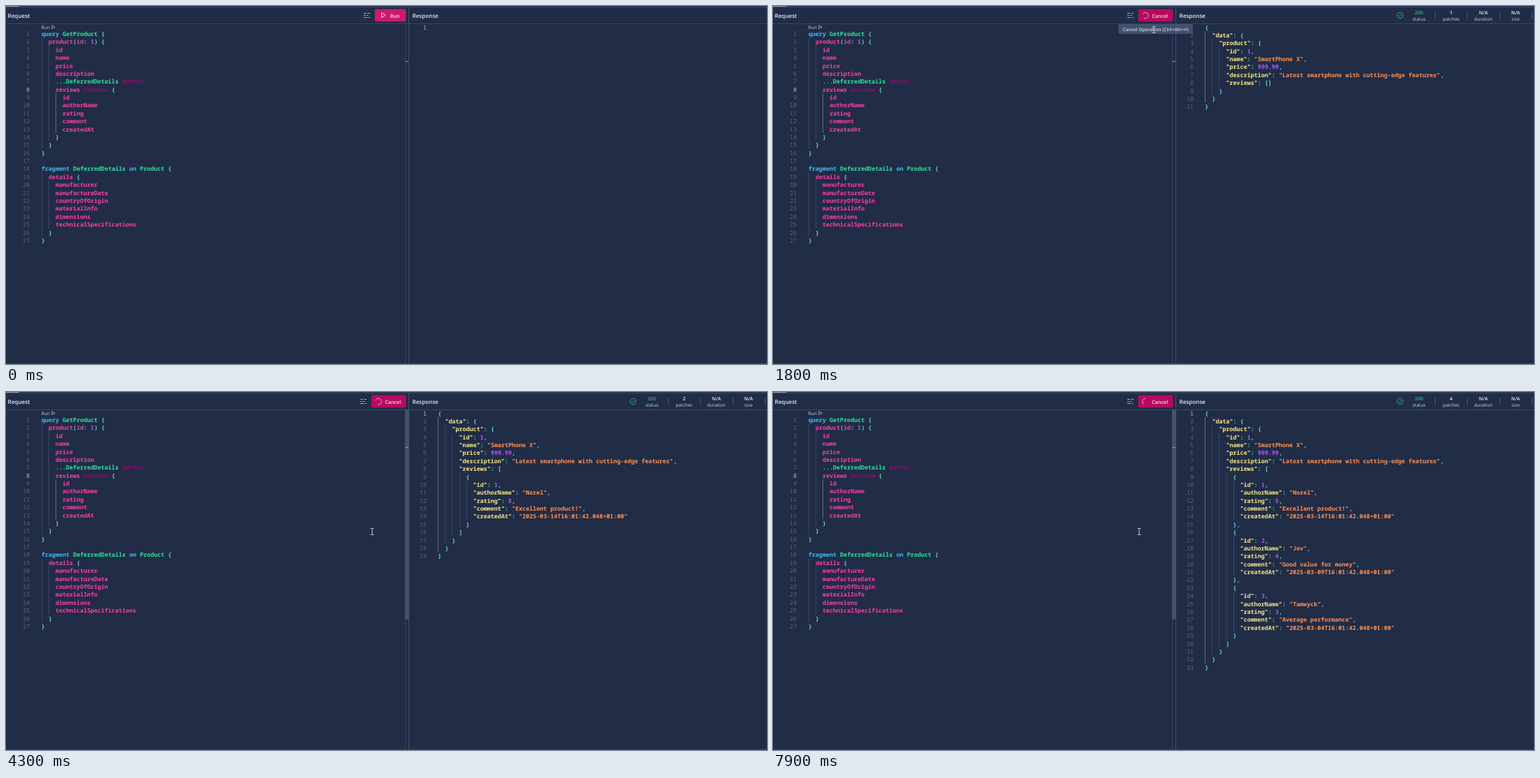
Write an HTML page with a canvas that moves like this. It is 1091 px wide and 513 px high and loops after 8 s.

```html
<!DOCTYPE html>
<html lang="en">
<head>
<meta charset="utf-8">
<title>Streaming query</title>
<style>
  html, body { margin: 0; width: 100%; height: 100%; overflow: hidden; background: #212c46; }
  canvas { display: block; }
</style>
</head>
<body>
<canvas id="stage" width="1091" height="513"></canvas>
<script>
const ctx = document.getElementById('stage').getContext('2d');
const LOOP = 8000, STEP = 100;
const MONO = '600 8.4px "Noto Sans Mono", "DejaVu Sans Mono", monospace';
const MONO_THIN = MONO.replace('600', '400');
const COL = 5.04, ROW = 11.38;
const C = {
  bg: '#212c46', border: '#3c4a68', guide: '#3a4764', guideOn: '#606d87',
  num: '#5a6782', numOn: '#b3bccb', text: '#e8ebf1', soft: '#cdd4df',
  keyword: '#40bdf4', type: '#2fe3a5', field: '#fc40a4', directive: '#8c0c6c',
  punct: '#62d6c8', number: '#a85ffa', key: '#f8e987', string: '#ff9055',
  ok: '#25c68c', button: '#cb1b6c', buttonOn: '#b50c60', tip: '#41506f'
};

const query = `query GetProduct {
  product(id: 1) {
    id
    name
    price
    description
    ...DeferredDetails @defer
    reviews @stream {
      id
      authorName
      rating
      comment
      createdAt
    }
  }
}

fragment DeferredDetails on Product {
  details {
    manufacturer
    manufactureDate
    countryOfOrigin
    materialInfo
    dimensions
    technicalSpecifications
  }
}`.split('\n');

const reviews = [
  ['Norel', 5, 'Excellent product!', '14'],
  ['Jev', 4, 'Good value for money', '09'],
  ['Tamwyck', 3, 'Average performance', '04']
].map(([authorName, rating, comment, day], i) => ({
  id: i + 1, authorName, rating, comment,
  createdAt: `2025-03-${day}T16:01:42.048+01:00`
}));

// Arrival of the first payload, then one review per gap
const FIRST = 1400, GAP = 1800;
const responses = [0, 1, 2, 3].map(n => JSON.stringify({
  data: { product: {
    id: 1, name: 'SmartPhone X', price: 999.99,
    description: 'Latest smartphone with cutting-edge features',
    reviews: reviews.slice(0, n)
  } }
}, null, 2).split('\n'));

const queryTokens = [
  [/^(query|fragment|on)$/, C.keyword], [/^@/, C.directive],
  [/^([A-Z]|\.\.\.)/, C.type], [/^\d/, C.number], [/^\w/, C.field], [/./, C.punct]
];
const jsonTokens = [
  [/^".*":$/, C.key], [/^"/, C.string], [/^\d/, C.number], [/./, C.punct]
];

const clamp = v => Math.max(0, Math.min(1, v));
const ui = (size, weight = 400) => `${weight} ${size}px "Open Sans", "Noto Sans", "DejaVu Sans", sans-serif`;

function text(s, x, y, font, color, align = 'left') {
  ctx.font = font;
  ctx.fillStyle = color;
  ctx.textAlign = align;
  ctx.fillText(s, x, y);
}

function rect(x, y, w, h, color) {
  ctx.fillStyle = color;
  ctx.fillRect(x, y, w, h);
}

function round(x, y, w, h, r, color) {
  ctx.fillStyle = color;
  ctx.beginPath();
  ctx.roundRect(x, y, w, h, r);
  ctx.fill();
}

function stroke(d, x, y, color, width = 1, cap = 'round') {
  ctx.save();
  ctx.translate(x, y);
  ctx.strokeStyle = color;
  ctx.lineWidth = width;
  ctx.lineJoin = 'round';
  ctx.lineCap = cap;
  ctx.stroke(new Path2D(d));
  ctx.restore();
}

function fillPath(d, x, y, fill, edge) {
  ctx.save();
  ctx.translate(x, y);
  const p = new Path2D(d);
  ctx.fillStyle = fill;
  ctx.fill(p);
  ctx.strokeStyle = edge;
  ctx.lineWidth = 0.6;
  ctx.stroke(p);
  ctx.restore();
}

// One code pane: indent guides, line numbers and coloured tokens
function code(lines, x, top, numX, split, rules, active, guideOn) {
  lines.forEach((line, i) => {
    const y = Math.round(top + i * ROW);
    const next = Math.round(top + (i + 1) * ROW);
    const indent = line.search(/\S/);
    for (let c = 0; c < indent; c += 2) {
      rect(Math.round(x + c * COL), y - 9, 1, next - y, guideOn(i + 1, c) ? C.guideOn : C.guide);
    }
    text(i + 1, numX, y, MONO_THIN, i + 1 === active ? C.numOn : C.num, 'right');
    for (const m of line.matchAll(split)) {
      const color = rules.find(r => r[0].test(m[0]))[1];
      const isKey = color === C.key;
      const at = x + m.index * COL;
      text(isKey ? m[0].slice(0, -1) : m[0], at, y, MONO, color);
      if (isKey) text(':', at + (m[0].length - 1) * COL, y, MONO, C.punct);
    }
  });
}

function frame() {
  rect(0, 0, 1091, 513, C.bg);
  rect(0, 1, 1091, 1, C.border);
  rect(0, 0, 19, 1, '#8d97a9');
  rect(0, 25, 1091, 1, C.border);
  rect(0, 512, 1091, 1, C.border);
  rect(572, 26, 1, 486, '#344160');
  rect(577, 2, 1, 510, '#43506d');
  text('Request', 2.5, 17, ui(8.1, 600), C.text);
  text('Response', 582.5, 17, ui(8.1, 600), C.text);
  text('Run', 50.6, 33, ui(6.6), C.soft);
  stroke('M0 0V4.4L4.2 2.2Z', 65.7, 28.2, C.soft, 0.7);
}

function scrollbar(alpha) {
  ctx.globalAlpha = alpha;
  rect(572, 26, 5, 300, '#44516d');
  ctx.globalAlpha = 1;
  rect(572, 79, 5, 1, '#71989f');
}

function stats(patches) {
  ctx.strokeStyle = C.ok;
  ctx.lineWidth = 0.9;
  ctx.beginPath();
  ctx.arc(899, 13.5, 4.2, 0, Math.PI * 2);
  ctx.stroke();
  stroke('M-1.8 0L-.5 1.4L2 -1.3', 899, 13.5, C.ok, 0.9);
  const items = [['200', 'status'], [patches, 'patches'], ['N/A', 'duration'], ['N/A', 'size']];
  items.forEach(([value, label], i) => {
    const x = 926 + i * 46.2;
    text(value, x, 11.5, ui(6.9, 600), i ? C.text : C.ok, 'center');
    text(label, x, 21, ui(6.6), C.soft, 'center');
    rect(Math.round(949 + i * 46.4), 8, 1, 11, '#4a5773');
  });
}

// Arc that grows from its head, then shrinks from its tail, while turning
function spinner(t) {
  const p = (((t - 2400) / 1270 + 0.93) % 1 + 1) % 1;
  const ease = u => u < 0.5 ? 2 * u * u : 1 - 2 * (1 - u) ** 2;
  const grow = ease(clamp(p * 2)), shrink = ease(clamp(p * 2 - 1));
  const from = 15 * grow + 110 * shrink;
  const to = Math.min(126.9, from + 1 + 99 * grow);
  const angle = v => (v / 126.9 + p) * Math.PI * 2;
  ctx.strokeStyle = '#f0b4cf';
  ctx.lineWidth = 0.9;
  ctx.beginPath();
  ctx.arc(534, 13.5, 4.3, angle(from), angle(to));
  ctx.stroke();
}

function toolbar(t, running, hover) {
  const left = running ? 523.7 : 528.7;
  round(left, 4.5, 573.3 - left, 17.8, 2, hover ? C.buttonOn : C.button);
  if (running) {
    spinner(t);
    text('Cancel', 543.2, 16.7, ui(7.2, 600), '#f6dce8');
  } else {
    stroke('M0 0V6.4L5 3.2Z', 538.5, 10.2, '#fbe6ef', 0.9);
    text('Run', 550.7, 16.7, ui(7.2, 600), '#fbe6ef');
  }
  stroke('M0 0H4M5.5 0H9M0 3H2.5M4 3H6.5M0 6H5M6.5 6H9', left - 15.7, 10.5, '#b9c1cf', 0.9, 'butt');
}

function tooltip(label, x, y, w, alpha) {
  ctx.globalAlpha = alpha;
  ctx.shadowColor = 'rgba(10,16,32,.35)';
  ctx.shadowBlur = 2;
  round(x, y, w, 14, 2, C.tip);
  ctx.shadowBlur = 0;
  text(label + ' Operation (Ctrl+Alt+⏎)', x + w / 2, y + 9.5, ui(6.6, 600), '#d3d9e4', 'center');
  ctx.globalAlpha = 1;
}

const shapes = {
  arrow: (x, y) => fillPath('M0 0V10L2.4 7.8L4 11.3L5.5 10.6L4 7.2H7.2Z', x, y, '#fff', '#111'),
  hand: (x, y) => fillPath('M2 .8Q2.8 -.3 3.6 .8V4.5L7 5.3Q8.4 5.7 8.2 7.2L7.4 12H3L.2 8.2Q-.6 6.9 .8 6.8L2 7.6Z', x, y, '#fff', '#111'),
  beam: (x, y) => stroke('M-2 -4.5H-.6L0 -4L.6 -4.5H2M0 -4V4M-2 4.5H-.6L0 4L.6 4.5H2', x, y, '#d7dce5', 0.9)
};

// [start time, shape, x, y]
const track = [
  [100, 'arrow', 1054, 17], [300, 'arrow', 985, 18], [400, 'arrow', 835, 20],
  [500, 'arrow', 674, 20], [600, 'hand', 572, 18], [700, 'hand', 557, 17],
  [1700, 'hand', 551, 15], [1800, 'beam', 546, 34], [1900, 'beam', 535, 112],
  [2000, 'beam', 527, 182], [2100, 'beam', 525, 200]
];

function draw(t) {
  const running = t >= 1200;
  const count = t < FIRST ? -1 : Math.min(3, Math.floor((t - FIRST) / GAP));
  frame();
  code(query, 50.8, 43, 34, /\.\.\.\w+|@?\w+|[^\s\w]/g, queryTokens, 8,
    (n, c) => c === 4 && n > 8 && n < 14);
  code(count < 0 ? [''] : responses[count], 619.3, 33.5, 603,
    /"[^"]*":?|[\d.]+|[^\s\w]/g, jsonTokens, 1, (n, c) => c === 0);
  scrollbar(clamp((t - 1800) / 200));
  if (count >= 0) stats(count + 1);
  toolbar(t, running, t >= 600);
  if (running) tooltip('Cancel', 495, 26, 107, clamp((2000 - t) / 200));
  else tooltip('Run', 503, 25.5, 95, clamp((t - 600) / 320));
  const cursor = track.filter(k => k[0] <= t).pop();
  if (cursor) shapes[cursor[1]](cursor[2], cursor[3]);
}

ctx.textRendering = 'geometricPrecision';
const start = performance.now();
function tick() {
  const t = (performance.now() - start) % LOOP;
  draw(Math.floor(t / STEP) * STEP);
  requestAnimationFrame(tick);
}
tick();
</script>
</body>
</html>
```
